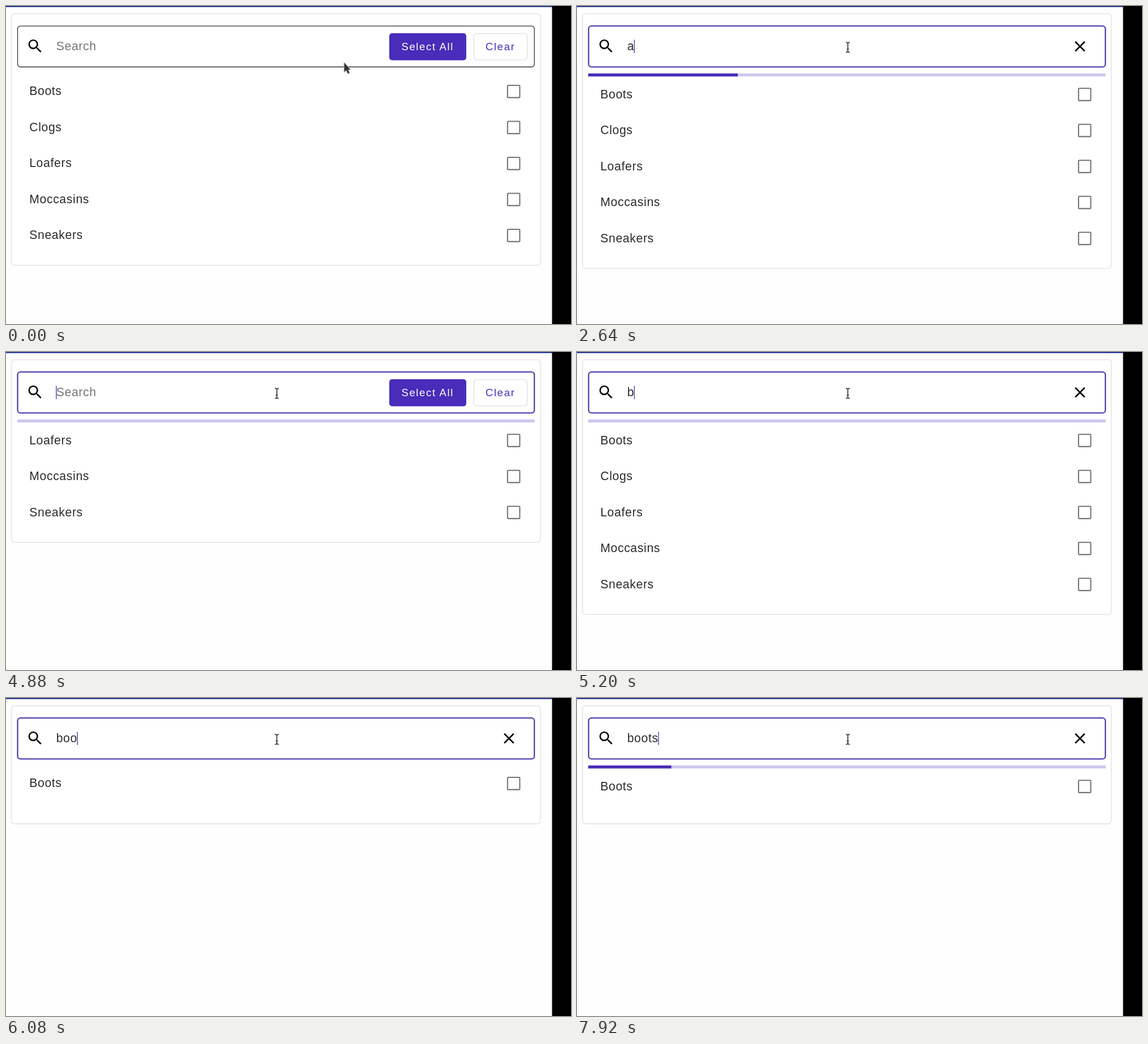
An HTML page for the animation above (8000 ms loop, 998 by 561 pixels).

```html
<!DOCTYPE html>
<html lang="en">
<head>
<meta charset="utf-8">
<title>Searchable list</title>
<style>
  html, body { margin: 0; width: 100%; height: 100%; overflow: hidden; background: #fefefe; }
  svg { display: block; width: 998px; height: 561px; }
  text { font: 21.17px "Liberation Sans", Arial, sans-serif; letter-spacing: .66px; fill: #2b2b2b; white-space: pre; }
  .button { font-size: 18.52px; letter-spacing: 1.654px; }
  .hint { fill: #757575; }
  .box { fill: none; stroke: #757575; stroke-width: 2.1; }
  .primary { fill: #492cba; }
</style>
</head>
<body>
<svg viewBox="0 0 998 561">
  <rect width="998" height="561" fill="#fefefe"/>
  <rect width="965" height="2" fill="#2b3a90"/>
  <rect x="964.5" width="33.5" height="561"/>

  <rect id="card" x="9.8" y="13.6" width="934" height="444" rx="5" fill="#fff" stroke="#e0e0e0" stroke-width="1.3"/>
  <rect id="field" x="20.5" y="35.3" width="912.8" height="72.2" rx="5" fill="#fff"/>
  <path transform="translate(35.6 55) scale(1.323)" d="M15.5 14h-.79l-.28-.27A6.47 6.47 0 0 0 16 9.5 6.5 6.5 0 1 0 9.5 16c1.61 0 3.09-.59 4.23-1.57l.27.28v.79l5 4.99L20.49 19l-4.99-5zm-6 0C7.01 14 5 11.99 5 9.5S7.01 5 9.5 5 14 7.01 14 9.5 11.99 14 9.5 14z"/>

  <g id="idle">
    <text class="hint" x="88.7" y="78">Search</text>
    <rect class="primary" x="677" y="48" width="136" height="47.7" rx="5"/>
    <text class="button" x="698.4" y="77.8" style="fill:#fff">Select All</text>
    <rect x="826.2" y="48.6" width="94.4" height="46.6" rx="5" fill="#fff" stroke="#e0e0e0" stroke-width="1.3"/>
    <text class="button primary" x="847" y="77.8" style="fill:#492cba">Clear</text>
  </g>
  <path id="close" transform="translate(872.6 55.4) scale(1.323)" d="M19 6.41L17.59 5 12 10.59 6.41 5 5 6.41 10.59 12 5 17.59 6.41 19 12 13.41 17.59 19 19 17.59 13.41 12z"/>
  <text id="query" x="88.7" y="78"></text>
  <rect id="caret" class="primary" y="59.5" width="1.3" height="23.5"/>

  <g id="progress">
    <rect x="19.8" y="119" width="914" height="5.3" fill="#cdc7ee"/>
    <rect id="fill" class="primary" y="119" height="5.3"/>
  </g>
  <g id="list"></g>

  <g id="arrow" transform="translate(597.6 100.5)">
    <path d="M0 0V15.6L3.6 12.4 6.3 18.4 8.9 17.2 6.3 11.4H10.4Z" fill="#333" stroke="#bbb" stroke-width="2.2" stroke-linejoin="round" paint-order="stroke"/>
  </g>
  <g id="beam" fill="none">
    <path d="M-3.4-8.8Q0-8.8 0-6.8 0-8.8 3.4-8.8M0-7V7M-3.4 8.8Q0 8.8 0 6.8 0 8.8 3.4 8.8M-1.8 3H1.8" stroke="#ccc" stroke-width="2.8"/>
    <path d="M-3.4-8.8Q0-8.8 0-6.8 0-8.8 3.4-8.8M0-7V7M-3.4 8.8Q0 8.8 0 6.8 0 8.8 3.4 8.8M-1.8 3H1.8" stroke="#3a3a3a" stroke-width="1.4"/>
  </g>
</svg>
<script>
  const LOOP = 8000, STEP = 80, FOCUS = 1600;
  const ROW = 63.5, BAR = 5.3;
  const items = ["Boots", "Clogs", "Loafers", "Moccasins", "Sneakers"];

  // [time, typed text, filter in effect, start of loading]
  const states = [
    [0, "", "", null],
    [2480, "a", "", 2480],
    [2800, "a", "a", null],
    [4880, "", "a", 4880],
    [5200, "b", "", 5200],
    [5600, "b", "b", null],
    [5680, "bo", "b", 5659],
    [5760, "boo", "bo", 5659],
    [6080, "boo", "boo", null],
    [7120, "boot", "boo", 7120],
    [7440, "boot", "boot", null],
    [7840, "boots", "boot", 7833]
  ];
  const caretOff = [[0, FOCUS], [2240, 2480], [3120, 3680], [4320, 4880], [6400, 6960], [7760, 7840]];
  const pointer = [[960, 566, 92], [1040, 518, 80], [1120, 487, 74.5], [1200, 478.4, 73]];

  const $ = id => document.getElementById(id);
  const show = (id, on) => { $(id).style.display = on ? "" : "none"; };
  const set = (id, attrs) => {
    for (const name in attrs) $(id).setAttribute(name, attrs[name]);
  };
  const latest = (list, t) => list.filter(entry => entry[0] <= t).pop();

  const rows = items.map(name => {
    const row = document.createElementNS("http://www.w3.org/2000/svg", "g");
    row.innerHTML = `<text x="41.2" y="157.4">${name}</text>
      <rect class="box" x="885.9" y="140" width="21.6" height="21.6" rx="1.6"/>`;
    $("list").append(row);
    return row;
  });

  function bezier(x1, y1, x2, y2, x) {
    const curve = (a, b, s) => 3 * (1 - s) ** 2 * s * a + 3 * (1 - s) * s * s * b + s ** 3;
    let low = 0, high = 1;
    for (let i = 0; i < 30; i++) {
      const mid = (low + high) / 2;
      if (curve(x1, x2, mid) < x) low = mid; else high = mid;
    }
    return curve(y1, y2, low);
  }

  function drawProgress(age) {
    const p = bezier(.65, .815, .735, .395, Math.min(age / 1260, 1));
    const left = Math.max(0, -.35 + 1.35 * p);
    const right = Math.min(1, 1.9 * p);
    set("fill", { x: 19.8 + 914 * left, width: 914 * Math.max(0, right - left) });
  }

  function drawList(filter, shift) {
    let count = 0;
    rows.forEach((row, i) => {
      const match = items[i].toLowerCase().includes(filter);
      row.style.display = match ? "" : "none";
      if (match) row.setAttribute("transform", `translate(0 ${ROW * count++ + shift})`);
    });
    const bottom = Math.max(222, 457.5 - ROW * (items.length - count) + shift);
    set("card", { height: bottom - 13.6 });
  }

  function draw(t) {
    const [, text, filter, start] = latest(states, t);
    const loading = start !== null;
    const focused = t >= FOCUS;

    set("field", { stroke: focused ? "#452ba8" : "#333", "stroke-width": focused ? 2.1 : 1.3 });
    show("idle", !text);
    show("close", text);
    $("query").textContent = text;
    const end = text ? $("query").getComputedTextLength() : 0;
    set("caret", { x: 88.2 + end });
    show("caret", !caretOff.some(([from, to]) => t >= from && t < to));

    show("progress", loading);
    if (loading) drawProgress(Math.max(0, t - start));
    drawList(filter, loading ? BAR : 0);

    const spot = latest(pointer, t);
    show("arrow", !spot);
    show("beam", spot);
    if (spot) set("beam", { transform: `translate(${spot[1]} ${spot[2]})` });
  }

  const origin = performance.now();
  function tick() {
    const t = (performance.now() - origin) % LOOP;
    draw(Math.floor(t / STEP) * STEP);
    requestAnimationFrame(tick);
  }
  tick();
</script>
</body>
</html>
```
